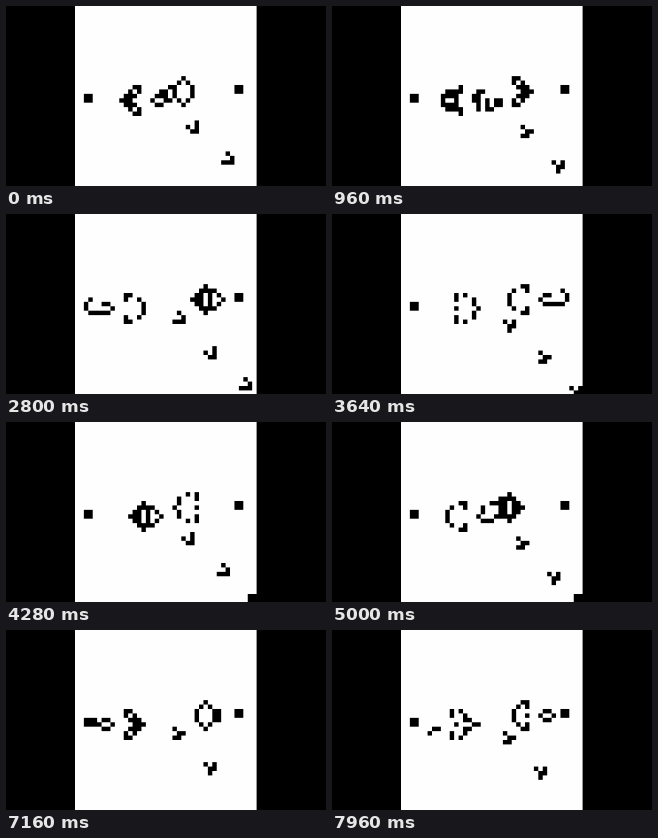
A matplotlib script that plays this animation: 320 by 180 pixels, repeating every 8 s.

```python
import numpy as np
import matplotlib.pyplot as plt
from matplotlib.animation import FuncAnimation

W, H, DPI = 320, 180, 100
FRAMES, INTERVAL = 200, 40
N = 41                     # cells per side
LEFT, TOP, SIDE = 69, -0.75, 181.6
GUN_COL, GUN_ROW = 2, 16
PAPER = 254

GUN = """
........................O
......................O.O
............OO......OO............OO
...........O...O....OO............OO
OO........O.....O...OO
OO........O...O.OO....O.O
..........O.....O.......O
...........O...O
............OO
""".split()

# The pace is a little uneven: time in ms, generations passed
TIMES = [0, 1800, 3640, 5000, 5880, 7160, 7960]
PASSED = [0, 11, 21.6, 31.1, 37, 45.4, 49.9]


def seed():
    grid = np.zeros((N, N), bool)
    for r, line in enumerate(GUN):
        for c, ch in enumerate(line):
            grid[GUN_ROW + r, GUN_COL + c] = ch == "O"
    return grid


def step(grid):
    p = np.pad(grid.astype(int), 1)
    near = sum(p[r:r + N, c:c + N] for r in range(3) for c in range(3)) - grid
    return (near == 3) | (grid & (near == 2))


def has_glider(grid, col, row):
    shape = np.array([[0, 1, 0], [0, 0, 1], [1, 1, 1]], bool)
    r, c = GUN_ROW + row, GUN_COL + col
    return np.array_equal(grid[r:r + 3, c:c + 3], shape)


def overlap(pixels, start):
    """Share of each pixel that each cell covers along one axis."""
    x = np.arange(pixels)[:, None]
    a = start + SIDE / N * np.arange(N)
    return np.clip(np.minimum(x + 1, a + SIDE / N) - np.maximum(x, a), 0, 1)


history = [seed()]
for _ in range(150):
    history.append(step(history[-1]))
# Begin when the first glider is well on its way to the corner
start = next((i for i, g in enumerate(history) if has_glider(g, 31, 17)), 63)

across, down = overlap(W, LEFT), overlap(H, TOP)


def picture(frame):
    gen = int(np.interp(frame * INTERVAL, TIMES, PASSED))
    return PAPER * down @ ~history[start + gen] @ across.T


fig = plt.figure(figsize=(W / DPI, H / DPI), dpi=DPI, facecolor="black")
ax = fig.add_axes([0, 0, 1, 1])
ax.axis("off")
image = ax.imshow(picture(0), cmap="gray", vmin=0, vmax=255,
                  interpolation="nearest", aspect="auto")


def draw(frame):
    image.set_data(picture(frame))
    return [image]


anim = FuncAnimation(fig, draw, frames=FRAMES, interval=INTERVAL,
                     repeat=True, repeat_delay=0, blit=False)
plt.show()
```
